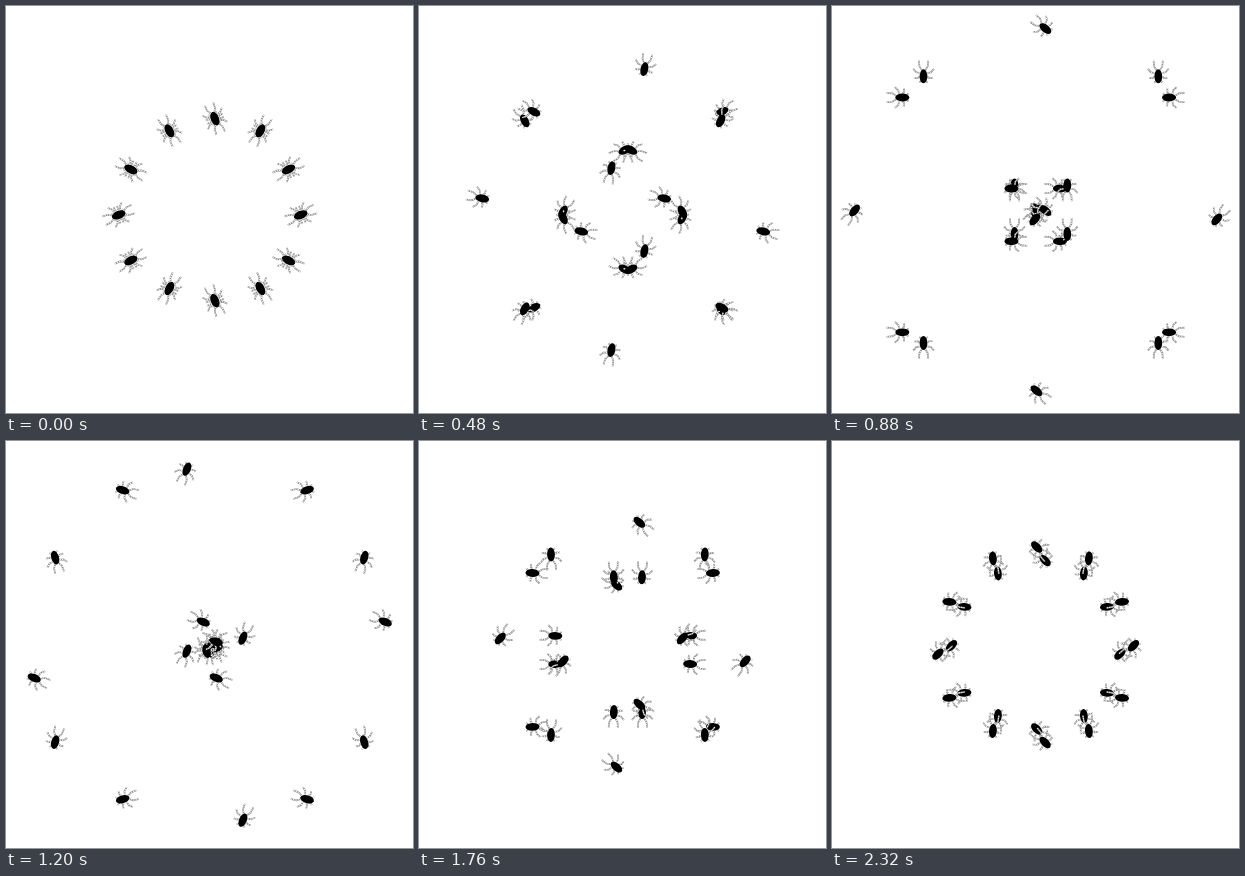
Write an HTML page with a canvas that moves like this. It is 407 px wide and 407 px high and loops after 2.4 s.

```html
<!DOCTYPE html>
<html lang="en">
<head>
<meta charset="utf-8">
<title>Beetles</title>
<style>
html, body { margin: 0; width: 100%; height: 100%; overflow: hidden; background: #fff; }
canvas { display: block; width: 100vw; height: 100vh; }
</style>
</head>
<body>
<canvas id="stage" width="407" height="407"></canvas>
<script>
const ctx = document.getElementById('stage').getContext('2d');
const STEP = 80, STEPS = 30, STRIDE = 27;
const RING = 91, NEAR = 203.7, FAR = 208.9, LEAN = 50;
const rad = deg => deg * Math.PI / 180;

// Lopsided figure eight through evenly timed points, walked at a steady pace
const loop = [
  [0, 0], [3.5, -24.5], [16.5, -49.5], [14.6, -75.3], [-3.3, -94],
  [-28, -84.5], [-19.5, -56], [5.2, -37], [20, -18.5], [16, 6.5]
];
const knot = i => loop[(i + loop.length) % loop.length];

function stride(i) {
  const [ax, ay] = knot(i - 1), [bx, by] = knot(i + 1);
  const k = STRIDE / Math.hypot(bx - ax, by - ay);
  return [(bx - ax) * k, (by - ay) * k];
}

function walk(phase) {
  const t = phase * loop.length, i = Math.floor(t), u = t - i;
  const from = knot(i), to = knot(i + 1), v0 = stride(i), v1 = stride(i + 1);
  const axis = n => {
    const a = from[n], b = to[n], va = v0[n], vb = v1[n];
    const c = 3 * (b - a) - 2 * va - vb, d = 2 * (a - b) + va + vb;
    return [a + u * (va + u * (c + u * d)), va + u * (2 * c + 3 * u * d)];
  };
  const [x, dx] = axis(0), [y, dy] = axis(1);
  return { x, y, heading: Math.atan2(dx, -dy) };
}

// Four bent legs per side, fanned from front to back
const limbs = new Path2D();
for (const side of [-1, 1])
  for (let i = 0; i < 4; i++) {
    const a = rad(20 + i * 42), reach = 12 + 4 * Math.cos(a);
    const point = (r, bend) =>
      [side * 0.85 * r * Math.sin(a + bend), -1 - r * Math.cos(a + bend)];
    limbs.moveTo(...point(5, 0));
    limbs.lineTo(...point(reach * 0.65, 0.15));
    limbs.lineTo(...point(reach, 0));
  }

function strokeLimbs(color, width, dash) {
  ctx.strokeStyle = color;
  ctx.lineWidth = width;
  ctx.setLineDash(dash);
  ctx.stroke(limbs);
}

function beetle() {
  strokeLimbs('#888', 1.6, []);
  strokeLimbs('#fff', 0.9, [1.4, 1]);
  ctx.fillStyle = '#000';
  ctx.beginPath();
  ctx.ellipse(0, 0, 3.9, 7, 0, 0, 2 * Math.PI);
  ctx.fill();
}

// Two beetles leave each of twelve spots in opposite directions
function draw(phase) {
  const { x, y, heading } = walk(phase);
  ctx.fillStyle = '#fff';
  ctx.fillRect(0, 0, 407, 407);
  for (let k = 0; k < 12; k++) {
    const sin = Math.sin(rad(k * 30)), cos = Math.cos(rad(k * 30));
    const steep = Math.abs(cos) > Math.abs(sin);
    const turn = [0, LEAN, 90 - LEAN][k % 3] + 90 * Math.floor(k / 3);
    for (const half of [0, 180]) {
      ctx.save();
      ctx.translate((steep ? FAR : NEAR) + RING * sin, (steep ? NEAR : FAR) - RING * cos);
      ctx.rotate(rad(turn + half));
      ctx.scale(k % 3 === 2 ? -1 : 1, 1);
      ctx.translate(x, y);
      ctx.rotate(heading);
      beetle();
      ctx.restore();
    }
  }
}

const start = performance.now();
function frame() {
  const step = Math.floor((performance.now() - start) / STEP) % STEPS;
  draw(step / STEPS);
  requestAnimationFrame(frame);
}
frame();
</script>
</body>
</html>
```
